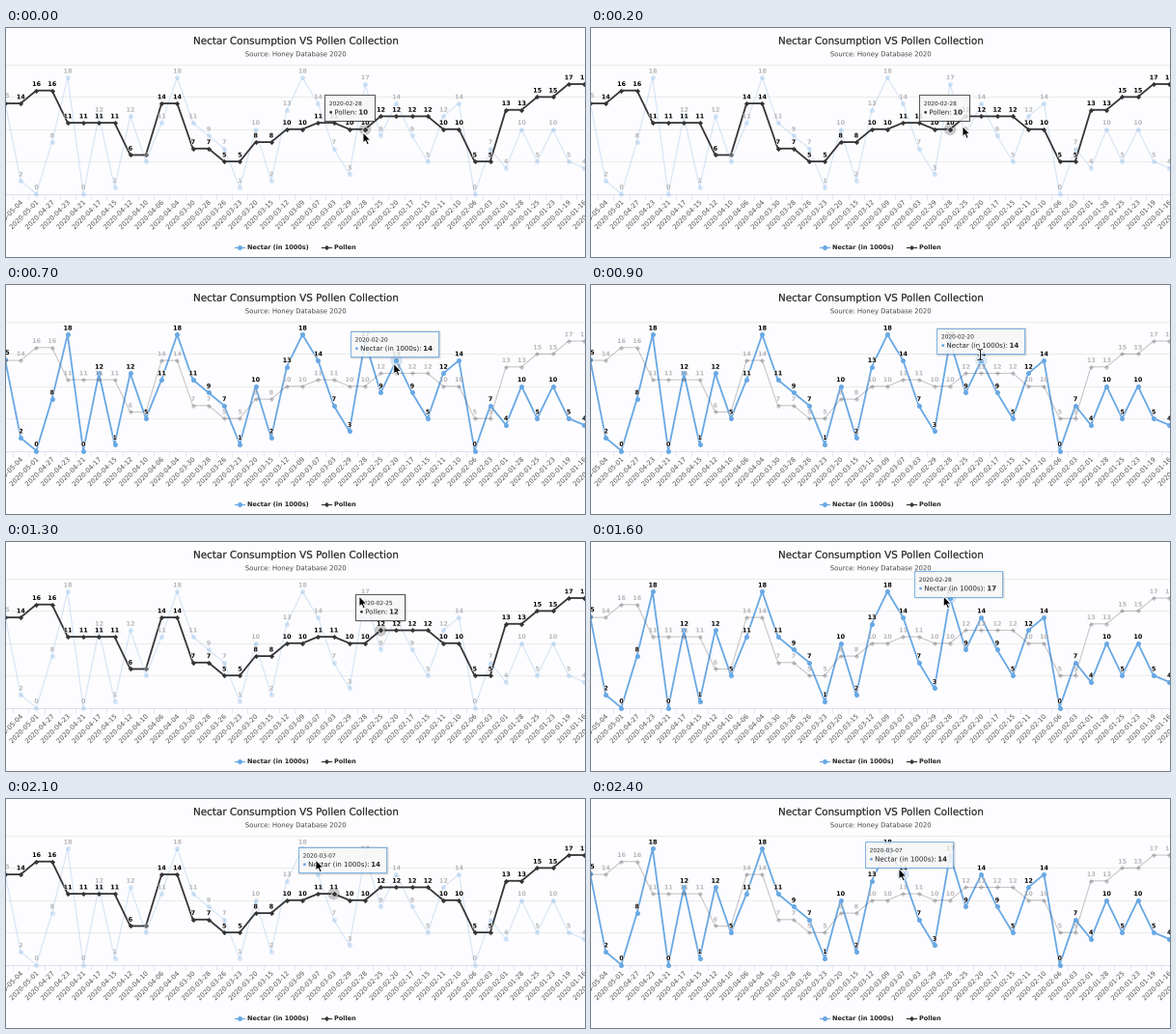
Recreate the animation shown at these times as a matplotlib script. Size 600 by 237 pixels, loop 2.5 s.

```python
import math

import matplotlib.pyplot as plt
import numpy as np
from matplotlib.animation import FuncAnimation
from matplotlib.patches import Circle, PathPatch, Polygon
from matplotlib.textpath import TextPath
from matplotlib.transforms import Affine2D

W, H, DPI = 600, 237, 72  # at 72 dpi one point is one pixel
FRAMES, STEP_MS = 25, 100
BG, INK = "#fdfcfe", "#222222"
FADED = 0.27
TIP_H, TIP_GAP, TIP_SPEED = 26.5, 9, 0.38

DAYS = (
    "05-04 05-01 04-27 04-23 04-21 04-17 04-15 04-12 04-10 04-06 04-04 "
    "03-30 03-28 03-26 03-23 03-20 03-15 03-12 03-09 03-07 03-03 02-29 "
    "02-28 02-25 02-20 02-17 02-15 02-11 02-10 02-06 02-03 02-01 01-28 "
    "01-25 01-23 01-19 01-16 01-12 01-10"
).split()

# Values start one day before DAYS[0], just off the left edge.
NECTAR = [14.2, 2, 0, 8, 18, 0, 12, 1, 12, 5, 11, 18, 11, 9, 7, 1, 10, 2, 13,
          18, 14, 7, 3, 17, 9, 14, 9, 5, 12, 14, 0, 7, 4, 10, 5, 10, 5, 4, 3]
POLLEN = np.repeat([14, 16, 11, 11, 6, 14, 7, 5, 8, 10, 11, 10, 12, 12, 10, 5,
                    13, 15, 17, 17], 2)[:len(NECTAR)]

SERIES = {
    "nectar": dict(name="Nectar (in 1000s)", color="#68a8e4", marker="o",
                   ms=5, tip_w=91, values=NECTAR),
    "pollen": dict(name="Pollen", color="#353538", marker="D",
                   ms=3.7, tip_w=51.5, values=POLLEN),
}

# start frame, series and day under the mouse
HOVERS = [(0, "pollen", 22), (4, "pollen", 23), (5, "nectar", 24),
          (10, "pollen", 23), (14, "nectar", 22), (18, "pollen", 20),
          (21, "nectar", 19)]

# frame, x, y of the mouse
MOUSE = np.array([(0, 370, 108), (4, 400, 95), (9, 403, 72), (13, 366, 56),
                  (17, 365, 56), (21, 321, 63), (24, 319, 72)])
ARROW = np.array([(0, 0), (0, 11), (2.5, 8.8), (4.3, 12.8), (6.2, 12),
                  (4.5, 8.1), (7.8, 8.1)])


def day_x(i):
    return 15.2 + 16.22 * i


def value_y(v):
    return 171.5 - 6.675 * v


def point(key, i):
    return day_x(i), value_y(SERIES[key]["values"][i + 1])


def hover_at(n):
    return [h[1:] for h in HOVERS if h[0] <= max(n, 0)][-1]


def tip_goal(key, i):
    x, y = point(key, i)
    return np.array([x - SERIES[key]["tip_w"] / 2, y - TIP_GAP - TIP_H])


def tip_position(n):
    """The tooltip closes a fixed share of the remaining distance each frame."""
    pos = tip_goal("pollen", 21)
    for k in range(1, n + 1):
        pos = pos + TIP_SPEED * (tip_goal(*hover_at(k)) - pos)
    return pos


fig = plt.figure(figsize=(W / DPI, H / DPI), dpi=DPI, facecolor=BG)
ax = fig.add_axes([0, 0, 1, 1])
ax.set_xlim(0, W)
ax.set_ylim(H, 0)
ax.axis("off")


def text(x, y, s, size, color=INK, bold=False, align=0.0, angle=0, z=5, outline=0):
    """Add text with its baseline at y; align is 0 left, 0.5 centre, 1 right."""
    font = {"family": "DejaVu Sans", "weight": "bold" if bold else "normal"}
    path = TextPath((0, 0), s, size=size, prop=font)
    place = (Affine2D().translate(-align * path.get_extents().xmax, 0)
             .rotate_deg(angle).scale(1, -1).translate(x, y))
    return ax.add_patch(PathPatch(path, fc=color, ec=color, lw=outline,
                                  joinstyle="round", snap=False, zorder=z,
                                  transform=place + ax.transData))


def draw_frame():
    text(W / 2, 16.7, "Nectar Consumption VS Pollen Collection", 10.4,
         align=0.5, outline=0.2)
    text(W / 2, 29.3, "Source: Honey Database 2020", 6.88, "#444444", align=0.5)
    for v in range(0, 21, 5):
        ax.plot([0, W], [value_y(v)] * 2, color="#e4e4e6" if v else "#ccd6eb",
                lw=0.7, zorder=1)
    for i, day in enumerate(DAYS):
        tick = day_x(i - 0.5)
        ax.plot([tick, tick], [171.5, 177], color="#ccd6eb", lw=0.5, zorder=1)
        text(day_x(i) + 2.3, 181.3, f"2020-{day}", 6.8, "#555555", align=1, angle=45)


def draw_legend():
    for key, x in (("nectar", 237), ("pollen", 327)):
        s = SERIES[key]
        ax.plot([x, x + 9.5], [226.5] * 2, color=s["color"], lw=1.2)
        ax.plot(x + 4.7, 226.5, s["marker"], color=s["color"], ms=s["ms"], mew=0)
        text(x + 13, 229, s["name"], 6.5, bold=True)


def draw_series(key, z):
    s = SERIES[key]
    days = range(-1, len(s["values"]) - 1)
    xs, ys = zip(*(point(key, i) for i in days))
    line, = ax.plot(xs, ys, color=s["color"], marker=s["marker"], ms=s["ms"],
                    mew=0, zorder=z, solid_joinstyle="round")
    labels = []
    for x, y, v, nectar in zip(xs, ys, s["values"], NECTAR):
        if key == "pollen" and -0.5 < v - nectar <= 1:
            continue  # would collide with the nectar label
        for color, outline in ((BG, 1.3), ("black", 0)):
            labels.append(text(x, y - 4.7, str(math.ceil(v)), 6.4, color, True,
                               0.5, z=z + 2, outline=outline))
    return line, labels


draw_frame()
draw_legend()
plots = {"nectar": draw_series("nectar", 2), "pollen": draw_series("pollen", 3)}
live = []


def set_active(active):
    for key, (line, labels) in plots.items():
        on = key == active
        line.set_linewidth(1.8 if on else 1.1)
        for artist in (line, *labels):
            artist.set_alpha(1 if on else FADED)


def draw_halo(key, i):
    s, (x, y) = SERIES[key], point(key, i)
    live.append(ax.add_patch(Circle((x, y), 6.2, fc=s["color"], alpha=0.27,
                                    lw=0, zorder=3.5)))
    live.extend(ax.plot(x, y, s["marker"], color=s["color"], ms=s["ms"] + 1.2,
                        mec=BG, mew=0.6, zorder=4))


def draw_tooltip(key, i, left, top):
    s = SERIES[key]
    right, bottom = left + s["tip_w"], top + TIP_H
    box = np.array([(left, top), (right, top), (right, bottom), (left, bottom)])
    for lw in (3, 2, 1):
        live.append(ax.add_patch(Polygon(box + 0.7, fill=False, ec="black", lw=lw,
                                         alpha=0.06, joinstyle="round", zorder=7)))
    live.append(ax.add_patch(Polygon(box, fc=(0.97, 0.97, 0.97, 0.87),
                                     ec=s["color"], lw=0.8, joinstyle="round",
                                     zorder=8)))
    live.append(text(left + 4.8, top + 10.9, f"2020-{DAYS[i]}", 5.85, z=9))
    live.append(ax.add_patch(Circle((left + 6.6, top + 18), 1.4, fc=s["color"],
                                    lw=0, zorder=9)))
    name = text(left + 10.3, top + 20.3, s["name"] + ":", 7, z=9)
    value_x = left + 12.8 + name.get_path().get_extents().xmax
    value = text(value_x, top + 20.3, str(s["values"][i + 1]), 7, bold=True, z=9)
    live.extend((name, value))


def draw_arrow(x, y):
    live.append(ax.add_patch(Polygon(ARROW + (x, y), fc="black", ec="white",
                                     lw=0.9, joinstyle="round", zorder=12)))


def draw_text_cursor(x, y):
    serif = np.array([-2.3, 0, 2.3])
    for color, lw in (("white", 2.2), ("black", 0.9)):
        style = dict(color=color, lw=lw, zorder=12)
        live.extend(ax.plot([x, x], [y - 4.6, y + 4.6], **style))
        for side in (-1, 1):
            ys = y + side * (4.6 + abs(serif) / 2)
            live.extend(ax.plot(x + serif, ys, **style))


def update(n):
    while live:
        live.pop().remove()
    tip, before = hover_at(n), hover_at(n - 1)
    # Another series lights up one frame after its tooltip appears.
    lit = tip if tip[0] == before[0] else before
    set_active(lit[0])
    draw_halo(*lit)
    draw_tooltip(*tip, *tip_position(n))
    x, y = (np.interp(n, MOUSE[:, 0], MOUSE[:, k]) for k in (1, 2))
    over_label = abs(n - 9) <= 1
    (draw_text_cursor if over_label else draw_arrow)(x, y)
    return live


anim = FuncAnimation(fig, update, frames=FRAMES, interval=STEP_MS, repeat=True,
                     repeat_delay=0, blit=False)
plt.show()
```
